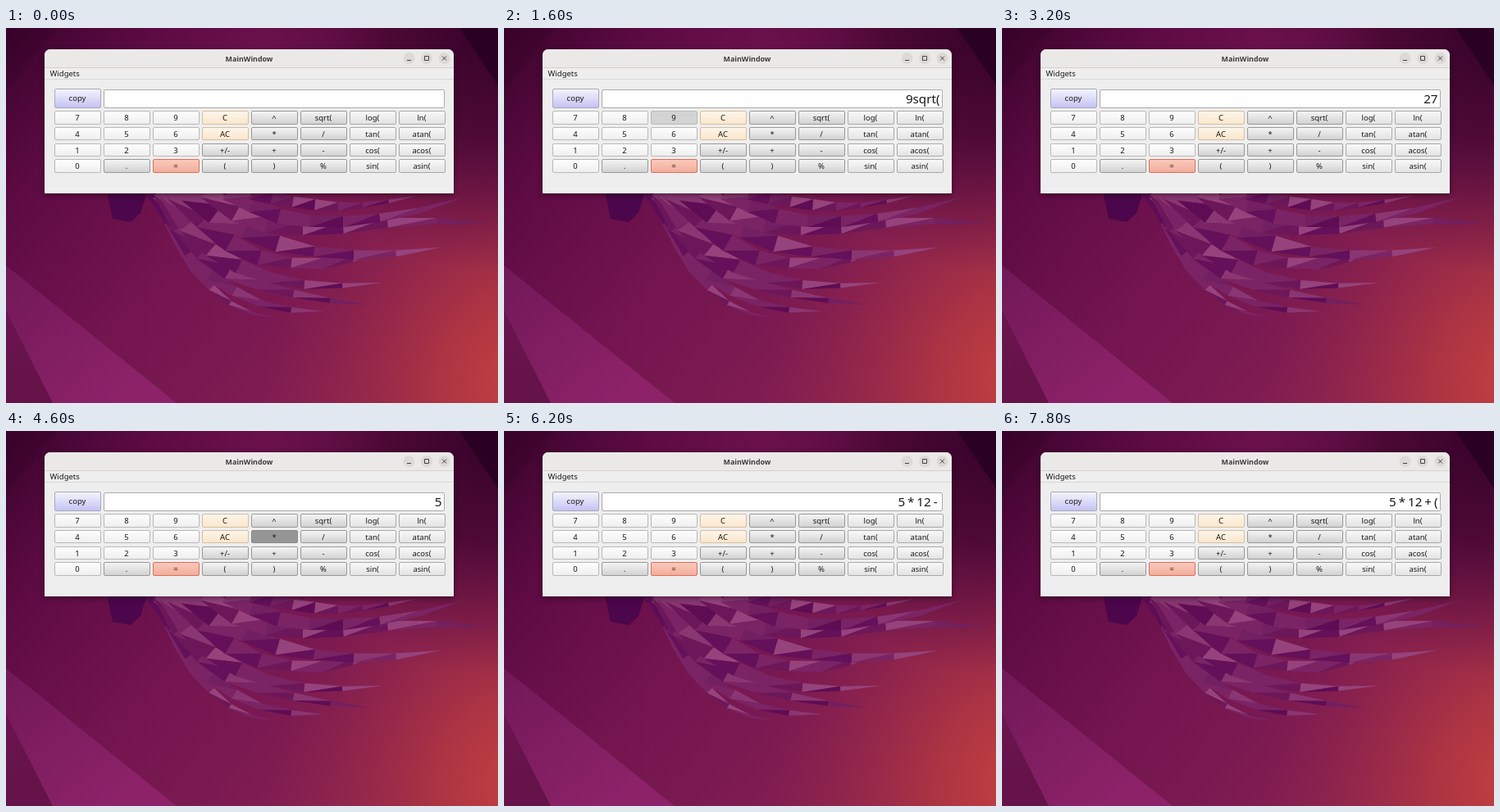
Write an HTML page with a canvas that moves like this. It is 600x458 px and loops after 8000 ms.

```html
<!DOCTYPE html>
<html lang="en">
<head>
<meta charset="utf-8">
<title>Calculator</title>
<style>
html, body { margin: 0; width: 600px; height: 458px; overflow: hidden; background: #6a0f4c; }
* { box-sizing: border-box; }
canvas { position: absolute; left: 0; top: 0; }
#window {
  position: absolute; left: 47px; top: 26px; width: 499px; height: 176px;
  background: #efeeef; border-radius: 7px 7px 0 0; box-shadow: 0 2px 7px rgba(0,0,0,.45);
  font: 500 9.5px/14px "Noto Sans", "Open Sans", sans-serif; color: #181818;
}
#title {
  height: 23px; background: #ebe9e8; border-bottom: 1px solid #d3d0ce; border-radius: 7px 7px 0 0;
  font-weight: bold; font-size: 8.9px; line-height: 23px; text-align: center; color: #3d3d3d;
}
#title svg { position: absolute; left: 436px; top: 3px; }
#menu { height: 14px; padding-left: 6.5px; line-height: 13px; border-bottom: 1px solid #d8d7d8; }
#display, .key { position: absolute; border: 1px solid #aaa; border-radius: 2px; white-space: pre; }
#display {
  left: 71.5px; top: 48.5px; width: 416.5px; height: 23px; padding-right: 2.5px; background: #fefefe;
  font-size: 15.2px; line-height: 21px; text-align: right; word-spacing: -1px;
}
.key { width: 57px; height: 16.5px; line-height: 15.5px; text-align: center; }
.digit { background: linear-gradient(#fdfdfd, #efeff0); border-color: #b9b9b9; }
.op { background: linear-gradient(#f4f4f4, #d2d2d2); border-color: #999; }
.fn { background: linear-gradient(#f8f8f8, #e3e3e3); border-color: #a9a9a9; }
.clear { background: linear-gradient(#fdf5e9, #fae6cc); border-color: #d3bfa2; }
.equals { background: linear-gradient(#fac9bb, #f3ad9b); border-color: #d9705a; }
.copy { background: linear-gradient(#f3f4fb, #c5c3f4); border-color: #aaa9ba; height: 24px; line-height: 22px; }
.digit.down { background: #d3d3d3; }
.op.down { background: #969696; border-color: #8a8a8a; }
.clear.down { background: #e8c995; }
.equals.down { background: #df7c63; }
</style>
</head>
<body>
<canvas id="wallpaper" width="600" height="458"></canvas>
<div id="window">
  <div id="title">MainWindow
    <svg width="60" height="16" fill="none" stroke="#444">
      <g fill="#dcd9d7" stroke="none"><circle cx="8.5" cy="8" r="7"/><circle cx="30" cy="8" r="7"/><circle cx="51.5" cy="8" r="7"/></g>
      <path d="M6 10.5h5M27.5 5.5h5v5h-5zM49 5.5l5 5m0-5l-5 5"/>
    </svg>
  </div>
  <div id="menu">Widgets</div>
  <div id="display"></div>
</div>
<script>
const display = document.getElementById("display");
const keys = {};

function addKey(label, kind, x, y) {
  const key = document.createElement("div");
  key.className = "key " + kind;
  key.textContent = label;
  key.style.left = x + "px";
  key.style.top = y + "px";
  document.getElementById("window").append(key);
  keys[label] = key;
}

function keyKind(label, column) {
  if (/^\d$/.test(label)) return "digit";
  if (label === "=") return "equals";
  if (label === "C" || label === "AC") return "clear";
  return column > 5 ? "fn" : "op";
}

addKey("copy", "copy", 11.5, 48);
[
  "7 8 9 C ^ sqrt( log( ln(",
  "4 5 6 AC * / tan( atan(",
  "1 2 3 +/- + - cos( acos(",
  "0 . = ( ) % sin( asin("
].forEach((row, r) => row.split(" ").forEach((label, c) =>
  addKey(label, keyKind(label, c), 11.5 + 60 * c, 75 + 19.8 * r)));

// Time of each press; the display changes when the key is released 200 ms later.
const presses = [
  [200, "9", "9"], [1000, "sqrt(", "9sqrt("], [1600, "9", "9sqrt(9"],
  [2200, ")", "9sqrt(9)"], [2800, "=", "27"], [3600, "AC", ""],
  [4000, "5", "5"], [4600, "*", "5 * "], [5000, "1", "5 * 1"],
  [5200, "2", "5 * 12"], [5600, "-", "5 * 12 - "],
  [6600, "+", "5 * 12 + "], [7400, "(", "5 * 12 + ("]
];

function drawWallpaper() {
  const ctx = document.getElementById("wallpaper").getContext("2d");
  let seed = 29;
  const random = () => (seed = seed * 16807 % 2147483647) / 2147483647;

  function blend(gradient, ...stops) {
    stops.forEach(([at, color]) => gradient.addColorStop(at, color));
    return gradient;
  }
  const linear = (x0, y0, x1, y1, ...stops) => blend(ctx.createLinearGradient(x0, y0, x1, y1), ...stops);
  const radial = (x, y, r, ...stops) => blend(ctx.createRadialGradient(x, y, 0, x, y, r), ...stops);

  function polygon(points, fill) {
    ctx.beginPath();
    points.forEach(([x, y]) => ctx.lineTo(x, y));
    ctx.closePath();
    ctx.fillStyle = fill;
    ctx.fill();
  }
  const stage = [[0, 0], [600, 0], [600, 458], [0, 458]];

  polygon(stage, linear(0, 0, 560, 458,
    [0, "#39032b"], [.2, "#5e0b43"], [.45, "#72144f"], [.7, "#7d1b52"], [1, "#95294d"]));
  polygon(stage, radial(640, 430, 330, [0, "#c9433f"], [.35, "#b43840c0"], [1, "#8a204a00"]));
  polygon(stage, radial(600, 0, 300, [0, "#33022a"], [.45, "#42052fd0"], [1, "#5a0c4200"]));
  polygon([[0, 0], [62, 0], [0, 75]], "#30022740");
  polygon([[553, 0], [600, 0], [600, 70]], "#2b0123");
  polygon([[0, 290], [208, 458], [0, 458]], linear(0, 300, 130, 458, [0, "#721959"], [1, "#8d2269"]));
  polygon([[0, 345], [57, 458], [0, 458]], linear(0, 345, 30, 458, [0, "#6b1550"], [1, "#641248"]));
  polygon([[123, 200], [172, 200], [164, 226], [152, 237], [130, 233]], "#4c064b");
  polygon([[168, 200], [250, 200], [225, 250], [190, 232]], "#600d58");

  // Faceted ribbons, lit along the upper edge, each tapering along a cubic curve.
  const lit = ["#7a2465", "#8a3673", "#96437d", "#722061"];
  const shadow = ["#5e0d55", "#6c175a", "#64105a", "#7b2465"];
  const pick = list => list[Math.floor(random() * list.length)];
  function ribbon(x0, y0, x1, y1, x2, y2, x3, y3, width) {
    const steps = 7, left = [], right = [];
    for (let i = 0; i <= steps; i++) {
      const t = i / steps, u = 1 - t;
      const mix = (a, b, c, d) => u * u * u * a + 3 * u * u * t * b + 3 * u * t * t * c + t * t * t * d;
      const slope = (a, b, c, d) => u * u * (b - a) + 2 * u * t * (c - b) + t * t * (d - c);
      const x = mix(x0, x1, x2, x3), y = mix(y0, y1, y2, y3);
      const dx = slope(x0, x1, x2, x3), dy = slope(y0, y1, y2, y3), length = Math.hypot(dx, dy);
      const half = width / 2 * Math.pow(u, .65);
      const edge = side => {
        const offset = side * half * (.75 + .5 * random());
        return [x - dy / length * offset, y + dx / length * offset];
      };
      left.push(edge(-1));
      right.push(edge(1));
    }
    for (let i = 0; i < steps; i++) {
      polygon([left[i], left[i + 1], right[i]], pick(lit));
      polygon([right[i], left[i + 1], right[i + 1]], pick(shadow));
    }
  }

  [
    [188, 205, 212, 280, 255, 350, 330, 354, 16],
    [190, 200, 220, 300, 290, 350, 388, 346, 20],
    [192, 200, 230, 315, 330, 325, 443, 338, 24],
    [200, 200, 245, 305, 340, 325, 460, 311, 24],
    [210, 200, 270, 300, 385, 300, 455, 272, 26],
    [225, 200, 290, 270, 400, 290, 530, 268, 26],
    [245, 200, 320, 285, 430, 220, 592, 239, 25],
    [270, 200, 335, 245, 430, 250, 557, 207, 23],
    [300, 200, 355, 220, 420, 225, 500, 205, 18]
  ].forEach(curve => ribbon(...curve));
}

drawWallpaper();
const start = performance.now();

function render(now) {
  const time = Math.max(0, now - start) % 8000;
  let text = "", down = "";
  for (const [at, label, result] of presses) {
    if (time >= at + 200) text = result;
    else if (time >= at) down = label;
  }
  if (display.textContent !== text) display.textContent = text;
  for (const label in keys) keys[label].classList.toggle("down", label === down);
  requestAnimationFrame(render);
}
render(start);
</script>
</body>
</html>
```
